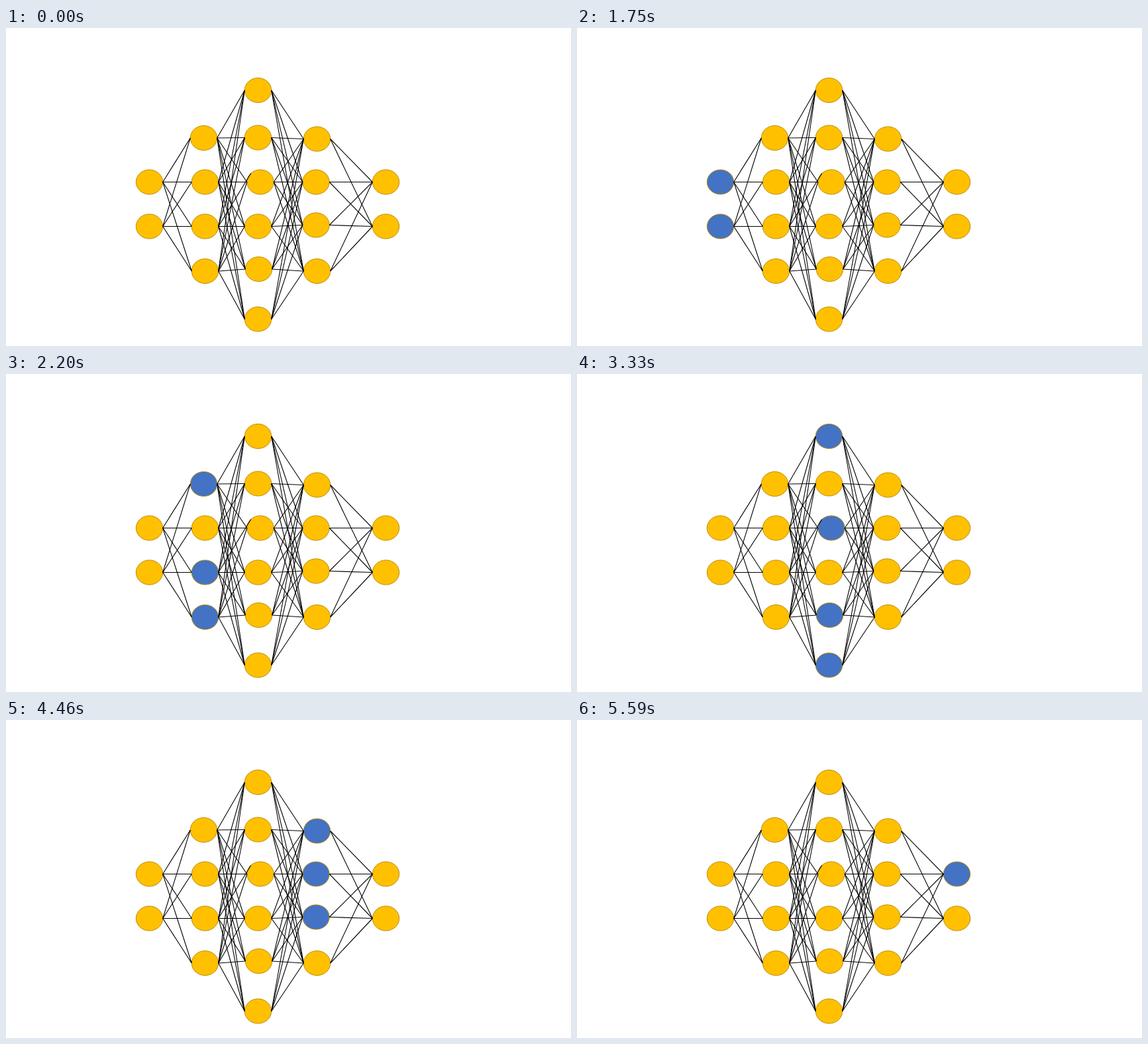
Recreate the animation shown at these times as an HTML page. Size 853 by 480 pixels, loop 6.72 s.

```html
<!DOCTYPE html>
<html lang="en">
<head>
<meta charset="utf-8">
<title>Neural network activation</title>
<style>
  html, body { margin: 0; width: 100%; height: 100%; overflow: hidden; background: #fff; }
  svg { display: block; }
  ellipse { fill: #ffc000; stroke: #bc8c00; stroke-width: 1; }
  line { stroke: #000; stroke-width: 1.1; }
</style>
</head>
<body>
<svg id="stage" width="853" height="480" viewBox="0 0 853 480"></svg>
<script>
const LOOP = 6720, FIRST = 1070, STEP = 1130;
const RX = 20.2, RY = 18.6;
const GOLD = '#ffc000', BLUE = '#4472c4';

// Node centres per layer, and which nodes light up when the layer fires.
const layers = [
  { nodes: [[216.5, 232.5], [216.5, 299.5]], active: [0, 1] },
  { nodes: [[298.5, 166], [300.5, 232.5], [300.5, 299.5], [300.5, 367]], active: [0, 2, 3] },
  { nodes: [[380.5, 94], [380.5, 165.5], [384, 232.5], [380.5, 299.5], [381.5, 364], [380.5, 439.5]],
    active: [0, 2, 4, 5] },
  { nodes: [[469.5, 167.5], [468, 232.5], [468, 297.5], [469.5, 367]], active: [0, 1, 2] },
  { nodes: [[573.5, 232.5], [573.5, 299.5]], active: [0] }
];

const stage = document.getElementById('stage');

function add(tag, attrs) {
  const el = document.createElementNS('http://www.w3.org/2000/svg', tag);
  for (const key in attrs) el.setAttribute(key, attrs[key]);
  return stage.appendChild(el);
}

function flash(el, start) {
  const animation = el.animate([
    { fill: GOLD, offset: 0 },
    { fill: BLUE, offset: start / LOOP },
    { fill: GOLD, offset: Math.min(1, (start + STEP) / LOOP) }
  ].map(k => ({ ...k, easing: 'step-end' })), { duration: LOOP, iterations: Infinity });
  animation.startTime = 0;
}

layers.forEach(({ nodes, active }, layer) => {
  nodes.forEach(([cx, cy], i) => {
    const node = add('ellipse', { cx, cy, rx: RX, ry: RY });
    if (active.includes(i)) flash(node, FIRST + layer * STEP);
  });
});

// Every node links to the whole next layer; one link lands on the upper rim.
layers.slice(0, -1).forEach(({ nodes }, layer) => {
  nodes.forEach(([x, y], i) => {
    layers[layer + 1].nodes.forEach(([nx, ny], j) => {
      const onRim = layer === 1 && i === 2 && j === 2;
      add('line', {
        x1: x + RX, y1: y,
        x2: onRim ? 369.8 : nx - RX, y2: onRim ? 219.2 : ny
      });
    });
  });
});
</script>
</body>
</html>
```
